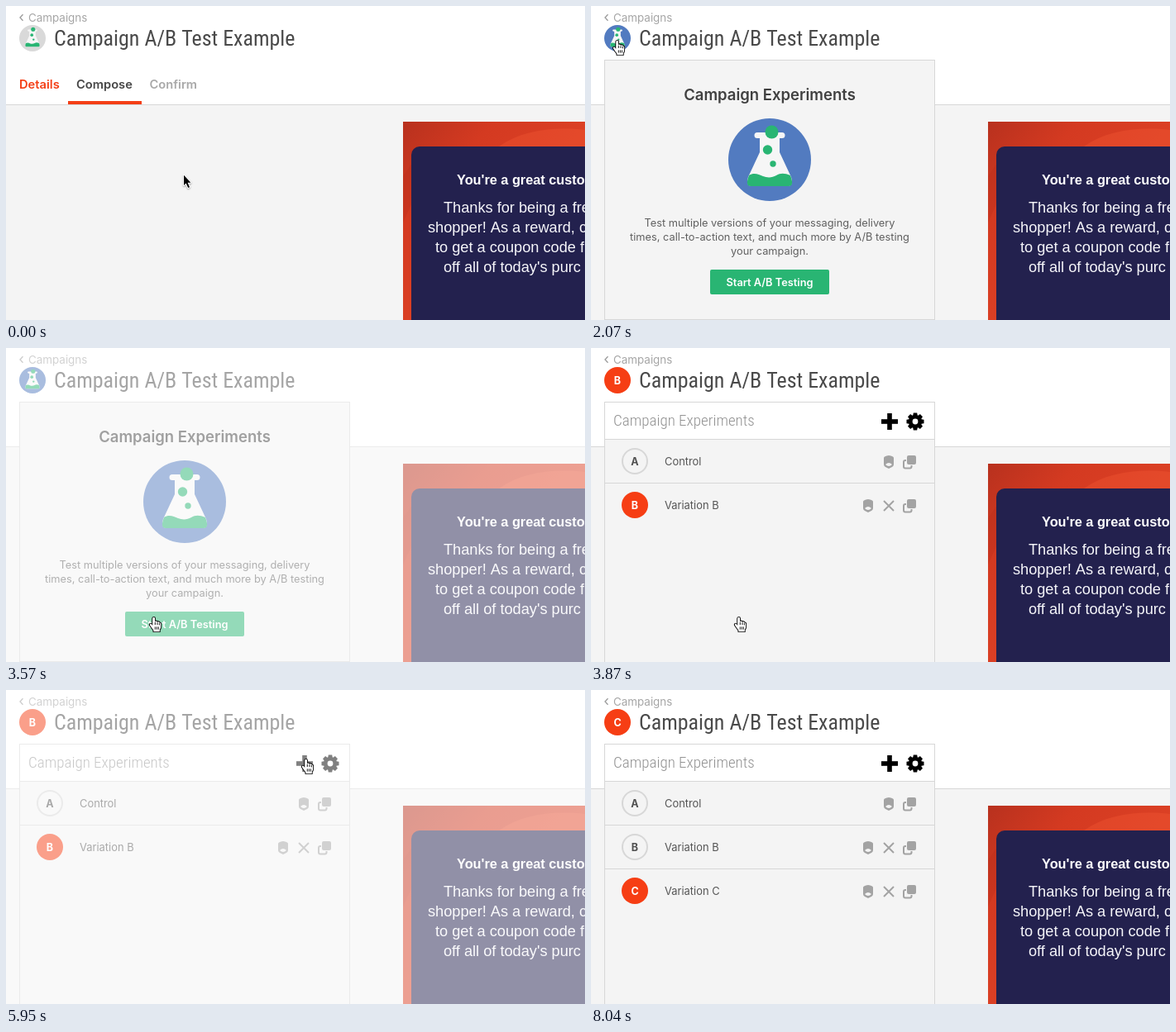
An HTML page with a canvas for the animation above (9190 ms loop, 700 by 380 pixels).

```html
<!DOCTYPE html>
<html lang="en">
<head>
<meta charset="utf-8">
<title>Campaign A/B test</title>
<style>
html, body { margin: 0; width: 100%; height: 100%; overflow: hidden; background: #fff; }
canvas { display: block; width: 700px; height: 380px; }
</style>
</head>
<body>
<canvas id="stage"></canvas>
<script>
const W = 700, H = 380, LOOP = 9190;
const UI = 'Inter, "Open Sans", sans-serif';
const MAIL = '"Liberation Sans", Arial, sans-serif';
const COND = '"Roboto Condensed", Roboto, sans-serif';
const ORANGE = '#f63e14', GREEN = '#29b573', BLUE = '#527bc0';
const BG = '#f4f4f4', LINE = '#d7d7d7', GREY = '#a3a3a3';

const canvas = document.getElementById('stage');
const ratio = window.devicePixelRatio || 1;
canvas.width = W * ratio;
canvas.height = H * ratio;
const c = canvas.getContext('2d');

// Cursor moves: start, last step, steps, x, y, shape on the way, shape at rest
const MOVES = [
  [440, 1030, 5, 45, 39, arrow, arrow],
  [1480, 1770, 3, 31, 41, hand, hand],
  [2370, 2970, 5, 178, 325, arrow, hand],
  [4620, 5350, 6, 362, 83, arrow, hand],
  [7750, 7895, 2, 511, 289, arrow, arrow]
];

function rect(x, y, w, h, color) {
  c.fillStyle = color;
  c.fillRect(x, y, w, h);
}

function round(x, y, w, h, r, color) {
  c.fillStyle = color;
  c.beginPath();
  c.roundRect(x, y, w, h, r);
  c.fill();
}

function disc(x, y, r, color) {
  c.fillStyle = color;
  c.beginPath();
  c.arc(x, y, r, 0, 7);
  c.fill();
}

function shape(d, fill, stroke, width) {
  const p = new Path2D(d);
  if (stroke) {
    c.strokeStyle = stroke;
    c.lineWidth = width;
    c.stroke(p);
  }
  if (fill) {
    c.fillStyle = fill;
    c.fill(p);
  }
}

function text(str, x, y, font, color, align = 'left') {
  c.font = font;
  c.fillStyle = color;
  c.textAlign = align;
  c.fillText(str, x, y);
}

function at(x, y, draw, scale = 1) {
  c.save();
  c.translate(x, y);
  c.scale(scale, scale);
  draw();
  c.restore();
}

function condensed(str, x, y, font, color) {
  text(str, x, y, `${font} ${COND}`, color);
}

function flask(color) {
  disc(0, 0, 50, color);
  shape('M-15-33H15a3.5 3.5 0 0 1 0 7H12V-9L26 21Q29 32 22 32H-22Q-29 32-26 21L-12-9V-26H-15a3.5 3.5 0 0 1 0-7Z', '#f6f6f6');
  shape('M-25 19C-19 15-13 18-8 20S3 22 8 19 18 16 25 19Q30 32 23 32H-23Q-30 32-25 19Z', GREEN);
  disc(2.5, -33.5, 8, GREEN);
  disc(-2.5, -12, 5.7, GREEN);
  disc(4, 5, 3.7, GREEN);
}

function badge(letter, x, y, active) {
  disc(x, y, 16, active ? ORANGE : LINE);
  if (!active) disc(x, y, 14, BG);
  text(letter, x, y + 4.5, `700 12.5px ${UI}`, active ? '#fff' : '#505050', 'center');
}

function mail() {
  const g = c.createLinearGradient(480, 140, 620, 260);
  g.addColorStop(0, '#b8311e');
  g.addColorStop(0.45, '#d43a21');
  g.addColorStop(1, '#dc4125');
  rect(480, 140, 220, 240, g);
  c.save();
  c.beginPath();
  c.rect(480, 140, 220, 240);
  c.clip();
  shape('M596 170C625 150 660 146 700 150V170Z', 'rgba(240,85,50,.4)');
  shape('M480 206L490 192V240L480 262Z', 'rgba(175,40,25,.2)');
  c.restore();
  round(490, 170, 230, 230, 10, '#23214e');
  text("You're a great custo", 545, 216, `700 16.3px ${MAIL}`, '#fff');
  const lines = ['Thanks for being a free', 'shopper! As a reward, c', 'to get a coupon code f', "off all of today's purc"];
  [529, 510, 519, 529].forEach((x, i) => text(lines[i], x, 250 + 24 * i, `18.2px ${MAIL}`, '#f6f6fa'));
}

function page() {
  rect(0, 0, W, H, BG);
  rect(0, 0, W, 119, '#fff');
  rect(0, 119, W, 1, LINE);
  shape('M20.5 10.3L17 14L20.5 17.7', null, '#9a9a9a', 1.3);
  text('Campaigns', 27, 19, `13.4px ${UI}`, '#a6a6a6');
  condensed('Campaign A/B Test Example', 58, 48, '400 condensed 26px', '#4a4a4a');
  const tab = `600 14.7px ${UI}`;
  text('Details', 16, 100, tab, '#f43f16');
  text('Compose', 85, 100, tab, '#474747');
  text('Confirm', 173.5, 100, tab, '#a9a9a9');
  rect(75, 115, 89, 4, '#f43f16');
  mail();
}

function panel() {
  rect(16, 65, 400, 315, LINE);
  rect(17, 66, 398, 314, BG);
}

function intro() {
  panel();
  rect(16, 379, 400, 1, LINE);
  text('Campaign Experiments', 216, 114, `600 18.5px ${UI}`, '#404040', 'center');
  at(216, 186, () => flask(BLUE));
  ['Test multiple versions of your messaging, delivery',
    'times, call-to-action text, and much more by A/B testing',
    'your campaign.'
  ].forEach((s, i) => text(s, 216, 267 + 17 * i, `12.8px ${UI}`, '#606060', 'center'));
  round(144, 319, 144, 30, 2, GREEN);
  text('Start A/B Testing', 216, 338.5, `600 12.8px ${UI}`, '#fff', 'center');
}

function bucket() {
  shape('M-6-5Q-6-7 0-8Q6-7 6-5V3Q6 5 4 6L0 8L-4 6Q-6 5-6 3Z', GREY);
  shape('M-4 3Q0-1 4 3Q0 7-4 3Z', BG);
}

function cross() {
  shape('M-6-6L6 6M6-6L-6 6', null, GREY, 2);
}

function copy() {
  c.strokeStyle = GREY;
  c.lineWidth = 2;
  c.beginPath();
  c.roundRect(-7, -2, 9.5, 9.5, 2);
  c.stroke();
  round(-4, -9, 13, 13, 2, BG);
  round(-3, -8, 11, 11, 2, GREY);
}

function gear() {
  for (let i = 0; i < 8; i++) {
    c.save();
    c.rotate(i * Math.PI / 4);
    shape('M-3-6L-2.2-10.5H2.2L3-6Z', '#000');
    c.restore();
  }
  disc(0, 0, 8, '#000');
  disc(0, 0, 3.4, '#fff');
}

function variants(letters) {
  panel();
  rect(17, 66, 398, 44, '#fff');
  condensed('Campaign Experiments', 27, 94, '300 condensed 19px', '#929292');
  rect(351, 86.2, 20, 5.6, '#000');
  rect(358.2, 79, 5.6, 20, '#000');
  at(392, 89, gear);
  [...letters].forEach((letter, i) => {
    const y = 137 + 53 * i;
    rect(17, y - 27, 398, 1, LINE);
    badge(letter, 53, y, i === letters.length - 1);
    text(i ? 'Variation ' + letter : 'Control', 89, y + 5, `12.9px ${UI}`, '#555');
    at(i ? 335 : 360, y + 1, bucket);
    if (i) at(360, y + 1, cross);
    at(385, y + 1, copy);
  });
}

function arrow() {
  c.lineJoin = 'round';
  c.save();
  c.shadowColor = 'rgba(0,0,0,.35)';
  c.shadowBlur = 2 * ratio;
  c.shadowOffsetY = ratio;
  shape('M1 1.8V14L3.7 11.5L6.2 17L8 16.2L5.6 10.8H9.4Z', null, '#fff', 2);
  c.restore();
  shape('M1 1.8V14L3.7 11.5L6.2 17L8 16.2L5.6 10.8H9.4Z', '#000');
}

function hand() {
  c.lineJoin = 'round';
  at(-5, 0, () => {
    shape('M4.2 11V2.4Q4.2.8 5.6.8T7.1 2.4V6.6Q7.4 5.4 8.6 5.5T10 6.9Q10.4 6 11.4 6.2T12.5 7.6Q14.2 7.1 14.2 9V12Q14.2 14.5 12.8 16V18.2H5.4V16.6Q3.4 14.4 1 10.6Q.3 9.2 1.4 8.7T4.2 11Z', '#fff', '#000', 1.8);
    shape('M7.3 6.8V10M10 7.2V10M12.4 8V10.4M7.3 12.4V15.6M9.4 12.4V15.6M11.4 12.4V15.6', null, '#000', 0.9);
  });
}

function cursor(t) {
  if (t >= 8040) return;
  let x = 214, y = 203, draw = arrow;
  for (const [start, end, steps, tx, ty, mid, rest] of MOVES) {
    if (t < start) break;
    const gap = (end - start) / (steps - 1);
    const k = Math.min(steps, Math.floor((t - start) / gap + 1e-6) + 1);
    const u = k / steps, e = u * u * (3 - 2 * u);
    x += (tx - x) * e;
    y += (ty - y) * e;
    draw = k === steps ? rest : mid;
  }
  at(Math.round(x), Math.round(y), draw);
}

function render(t) {
  c.setTransform(ratio, 0, 0, ratio, 0, 0);
  page();
  if (t < 3870) {
    if (t >= 2070) intro();
    at(32, 39, () => flask(t < 2070 ? '#d9d9d9' : BLUE), 0.32);
  } else {
    const letters = t < 6100 ? 'AB' : 'ABC';
    variants(letters);
    badge(letters.at(-1), 32, 39, true);
  }
  const loading = (t >= 3570 && t < 3870) || (t >= 5950 && t < 6100);
  if (loading) rect(0, 0, W, H, 'rgba(255,255,255,.5)');
  cursor(t);
}

const begin = performance.now();
function tick() {
  render((performance.now() - begin) % LOOP);
  requestAnimationFrame(tick);
}
tick();
</script>
</body>
</html>
```
